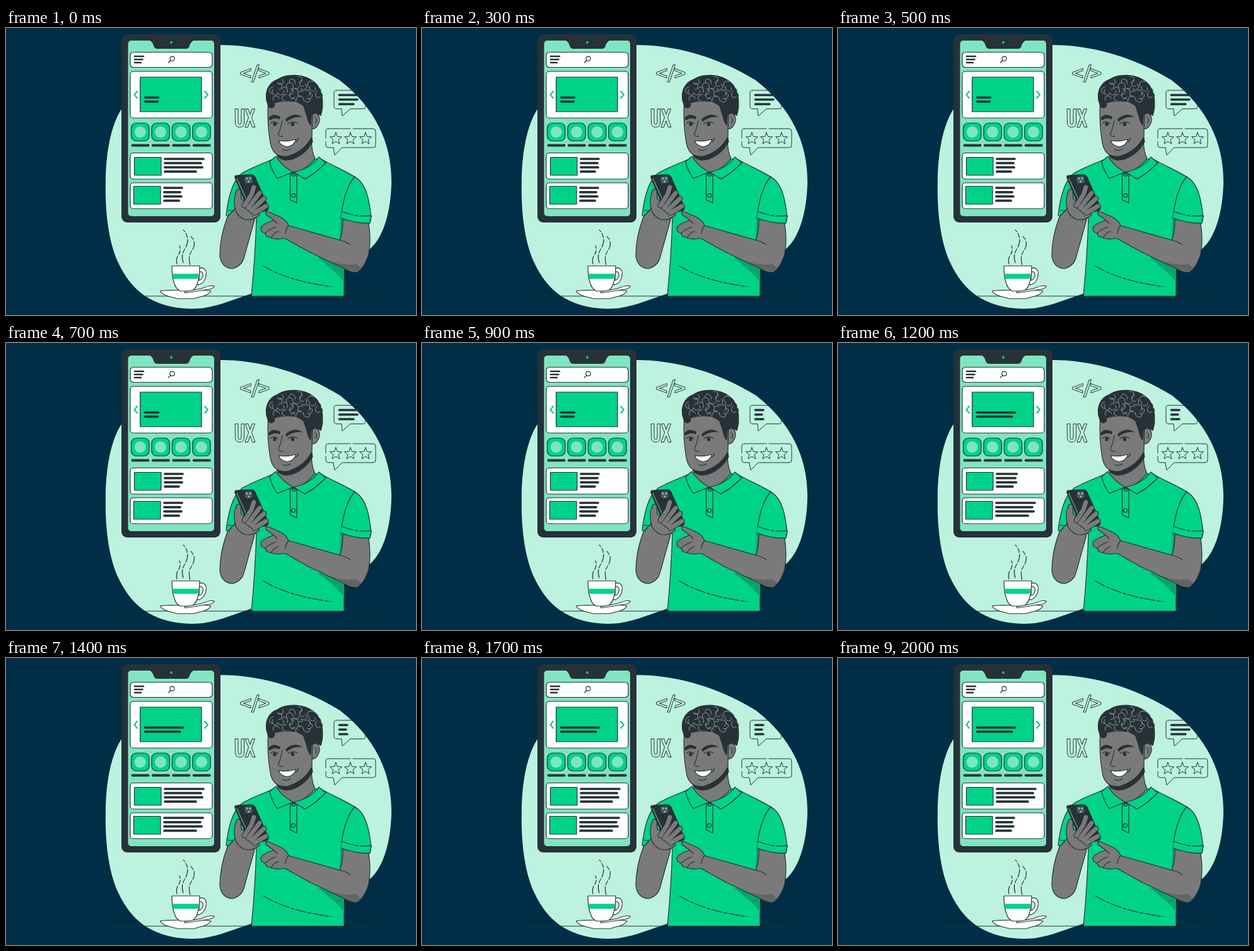
Animation, 650 px wide and 456 px high, one loop 2100 ms. Source, as an HTML page:

```html
<!DOCTYPE html>
<html lang="en">
<head>
<meta charset="utf-8">
<title>Designing a mobile app</title>
<style>
  html, body { margin: 0; width: 100%; height: 100%; overflow: hidden; background: #012e47; }
  svg { display: block; width: 650px; height: 456px; }
  .ink { stroke: #263238; stroke-width: 1.2; stroke-linejoin: round; stroke-linecap: round; }
  .thin { stroke-width: 1; }
  .line { fill: none; }
  .dark { fill: #263238; }
  .white { fill: #fff; }
  .green { fill: #00d387; }
  .shade { fill: #05a56d; }
  .mint { fill: #7fe5c1; }
  .skin { fill: #7a7a7a; }
  .dim { fill: #636363; }
  .bar { stroke: #263238; stroke-linecap: round; }
</style>
</head>
<body>
<svg viewBox="0 0 650 456">
  <path fill="#bdf2df" d="M335 27C405 26 474 49 529 83C586 127 612 184 611 246C610 299 595 340 572 355C535 382 448 403 389 422C351 435 325 446 298 446C225 446 196 410 179 375C162 340 157 290 158 246C158 200 166 155 183 129C213 74 269 29 335 27Z"/>
  <path class="ink line" d="M168 426H572M577 426H586M590 426H600"/>

  <g id="phone">
    <rect class="dark" x="183" y="10" width="157" height="299" rx="9"/>
    <rect class="mint" x="193.500" y="20" width="136.500" height="279" rx="5"/>
    <path class="dark" d="M225 18H301Q293 21 291 28Q290 33 285 33H240Q235 33 234 28Q232 21 225 18Z"/>
    <circle class="green" cx="262" cy="23" r="2"/>
    <g class="ink">
      <g class="white">
        <rect x="197" y="38.500" width="130" height="24" rx="5"/>
        <rect x="197" y="69" width="130" height="74" rx="4.500"/>
        <rect x="197" y="198.500" width="130" height="41.500" rx="4.500"/>
        <rect x="197" y="246" width="130" height="41" rx="4.500"/>
      </g>
      <g class="green">
        <rect x="212.700" y="78" width="97.300" height="55"/>
        <rect x="203.500" y="205.500" width="42.500" height="28.500"/>
        <rect x="202.500" y="251.500" width="42.500" height="28.500"/>
      </g>
      <circle class="line" cx="263.500" cy="48.700" r="3.500"/>
      <path class="line" d="M261 51.500L257.500 55"/>
    </g>
    <path class="bar" stroke-width="2.600" d="M204 45H218M204 50H216.500M204 55H214"/>
    <path fill="none" stroke="#00c880" stroke-width="2" d="M208.500 100L203.500 106L208.500 112M314.500 100L320 106L314.500 112"/>
    <g id="icons"></g>
  </g>

  <g id="signs" class="ink line thin">
    <path d="M388 64.500L371.500 70.500V73.500L388 79.500V76L376.500 72L388 68ZM398.500 58.500H401.500L392.500 86H389.500ZM401 64.500L417 70.500V73.500L401 79.500V76L412 72L401 68Z"/>
    <path d="M363.500 128.500h4.500v21q0 4 2.500 4t2.500-4v-21h4.500v21.500q0 7.500-7 7.500t-7-7.500ZM379.500 128.500h4.500l3 9 3-9h4.500l-5 14 5.500 15h-4.500l-3.500-10-3.500 10h-4.500l5.500-15Z"/>
    <path d="M524 99H558M562 99H566Q570 99 570 103V111M570 115V124Q570 128.500 566 128.500H546L533 140L532 128.500H524Q520 128.500 520 124V103Q520 99 524 99"/>
    <path d="M511 160H546M550 160H582Q586 160 586 164V186Q586 190 582 190H533L521 202L519 190H511Q507 190 507 186V180M507 175V164Q507 160 511 160"/>
  </g>

  <g id="cup" class="ink">
    <path class="line" stroke-dasharray="13 3 7 3" d="M271 375Q269 367 273 361Q278 354 275 346M281 373Q277 362 283 352Q290 341 287 331Q285 324 281 321M292 376Q288 364 294 355Q301 345 297 336L293 331"/>
    <path class="white" fill-rule="evenodd" d="M304 383C313 378 319 384 317 394C315 404 308 409 301 408ZM306 387V401C313 400 316 386 306 387Z"/>
    <path class="white" d="M244.500 418Q250 416.500 270 416.500H300Q320 416.500 325 418Q320 425 308 427L298 430H272L260 427Q248 424 244.500 418Z"/>
    <path class="white" d="M263 378H307Q307 396 303 407Q300 415 294 418H276Q269 414 267 406Q263 396 263 378Z"/>
    <path class="green" stroke="none" d="M264.500 390.500H305.500L304 398.500H265.500Z"/>
    <path class="white" d="M283 419L310 414Q324 408 330 410Q330 415 312 416.500L284 421Z"/>
  </g>

  <g id="man" class="ink">
    <path class="green" d="M424 208C404 217 386 223 374 231C358 243 352 271 349 298L382 302L397 303Q395 365 389 426H536V305L577 310L579 300C576 275 572 252 558 240C545 230 520 220 499 208Z"/>
    <path class="shade" stroke="none" d="M530 302L536 305V403Q522 386 495 366L526 351Q531 330 530 302Z"/>
    <path class="line" d="M553 236C541 250 534 272 531 302M389 250L387 260M352 289L373 294"/>
    <path class="line" stroke-dasharray="17 3 5 3" d="M408 378Q447 402 516 411"/>

    <path class="skin" d="M431 190V209Q438 224 455 232Q476 225 490 207Q484 198 484 169Z"/>
    <path class="dark" d="M429 200Q454 214 485 174L486 181C476 199 458 210 444 210Q435 209 430 203Z"/>
    <path class="skin" d="M481 140Q487 131 494 137Q500 144 495 153Q491 162 483 160Z"/>
    <path class="skin" d="M416 112C414 140 416 166 419 182C422 201 434 205 446 204Q473 196 485 173L486 118Z"/>
    <path class="dark" d="M415 121C408 103 416 87 430 82C446 71 473 74 486 84C502 94 505 122 499 139Q495 136 490 135L484 139L483 154Q479 150 477 140L472 124Q462 115 446 116Q430 116 419 122Z"/>
    <g id="curls" class="dark"></g>
    <path class="dark" stroke="none" d="M416 144Q422 134 435 141L434 145Q425 141 418 147ZM443 145Q457 132 471 142Q457 139 445 149Z"/>
    <path class="line" d="M438 147Q436 159 432 168Q431 173 439 172M420 151Q425 147 431 152M447 152Q454 147 462 151M490 143Q494 143 491 151M463 175Q464 179 460 181"/>
    <g class="dark" stroke="none"><ellipse cx="426" cy="153" rx="2.600" ry="3"/><ellipse cx="454.500" cy="153" rx="2.600" ry="3"/></g>
    <path class="white" d="M432 179Q446 181 460 177Q456 188 446 188.500Q436 188 432 179Z"/>
    <path class="line" d="M438 193Q445 196 451 192"/>

    <path class="green" d="M428 204L418 212Q421 227 430 239L455 229Q437 219 428 204ZM496 205L507 214Q492 230 474 240L456 229Q482 224 496 205Z"/>
    <path class="line" d="M450.500 231V273L461 278V232"/>
    <circle class="line" cx="456" cy="232.500" r="2.800"/>
    <circle class="line" cx="455.500" cy="266" r="3"/>

    <path class="skin" d="M351 300C344 319 339 337 339 361C340 376 350 383 361 382Q374 377 377 366L394 305L364 286Z"/>
    <path class="dark" d="M363 238Q362 234 367 234L388 233Q393 233 395 237L416 285Q416 290 411 291L386 293Z"/>
    <path class="line" style="stroke:#89969b" d="M366 239L380 270"/>
    <rect fill="#455a64" x="378" y="235" width="13" height="12" rx="3" transform="rotate(-5 384 241)"/>
    <g fill="#aab5b8" stroke="none"><circle cx="382" cy="239" r="1.500"/><circle cx="387" cy="239" r="1.500"/><circle cx="385" cy="244" r="1.500"/></g>
    <path class="skin" d="M364 290C360 276 362 265 366 257Q370 254 372 259L373 272L380 276L402 291L401 298Q391 307 378 304Q367 299 364 290Z"/>
    <g class="line">
      <path id="fingers" stroke-width="9" d="M378 282L389 265L393 253M384 286L402 262M389 290L409 271M394 294L412 283"/>
      <use href="#fingers" style="stroke:#7a7a7a" transform="translate(0 0)"/>
    </g>

    <path class="skin" d="M534 304L575 310Q579 337 575 359Q569 380 557 388Q547 389 536 382L481 356L442 334Q428 337 420 333Q411 332 411 326Q403 324 404 317Q408 311 420 307L424 305L412 296Q410 291 416 292L434 300Q445 305 448 314L529 337Q534 326 534 304Z"/>
    <path class="dim" stroke="none" d="M515 371Q536 378 556 375L562 382Q556 390 543 384Z"/>
    <path class="line" d="M411 326Q418 319 428 316M420 333Q424 326 432 323M424 305Q428 308 430 311M448 314Q443 320 443 327M529 337Q538 339 546 344"/>
    <path class="green" d="M532 293Q556 301 579 298L577 310Q555 311 531 302Z" stroke="none"/>
    <path class="line" d="M579 298L577 310Q555 311 531 302"/>
    <path class="line" stroke-dasharray="17 3 5 3" d="M534 292Q556 301 579 298"/>
  </g>
  <g id="bars" class="bar"></g>
</svg>
<script>
const $ = id => document.getElementById(id);
const add = (parent, tag, attrs) => {
  const el = document.createElementNS("http://www.w3.org/2000/svg", tag);
  for (const key in attrs) el.setAttribute(key, attrs[key]);
  return parent.appendChild(el);
};

for (let i = 0; i < 4; i++) {
  const x = 198.5 + i * 32.4;
  add($("icons"), "rect", { class: "green ink", x, y: 151, width: 28.5, height: 28.5, rx: 8 });
  add($("icons"), "circle", { class: "mint", cx: x + 14.2, cy: 165.3, r: 9 });
  add($("icons"), "path", { class: "bar", "stroke-width": 4, d: `M${x + 2} 186.500h25` });
}

for (const cx of [523, 546, 570]) {
  const points = Array.from({ length: 10 }, (_, i) => {
    const r = i % 2 ? 4.3 : 10, a = (i / 5 - 0.5) * Math.PI;
    return [cx + r * Math.cos(a), 176 + r * Math.sin(a)];
  });
  add($("signs"), "polygon", { points: points.join(" ") });
}

// Each finger is a skin-coloured stroke over a wider ink stroke
$("fingers").style.strokeWidth = 9;
const skinStroke = $("fingers").cloneNode();
skinStroke.removeAttribute("id");
skinStroke.style.cssText = "stroke:#7a7a7a;stroke-width:6.8";
document.querySelector("use").replaceWith(skinStroke);

// Bumpy rim of the hair, then loose curls inside it
for (let i = 0; i < 17; i++) {
  const a = Math.PI * (1 - 0.1 + i / 16 * 1.2);
  add($("curls"), "circle", { cx: 457.5 + 39 * Math.cos(a), cy: 112 + 31 * Math.sin(a), r: 6, stroke: "none" });
}
for (let i = 0; i < 26; i++) {
  const a = i * 2.4, r = Math.sqrt(i / 26);
  const x = 458 + 40 * r * Math.cos(a), y = 99 + 19 * r * Math.sin(a) + Math.max(0, Math.abs(x - 458) - 26) * 0.5;
  add($("curls"), "path", {
    fill: "none", style: "stroke:#a3abad;stroke-width:.8",
    d: "M-5 2Q-5-4 0-3Q5-2 5 3", transform: `translate(${x} ${y}) rotate(${i * 97})`
  });
}

const LOOP = 2100;
// keys: [time, openness]; closed and open list the right edges
const groups = [
  { x: 220.5, y: 110.5, step: 6.5, width: 3.5, closed: [241.5, 240.5], open: [281, 276],
    keys: [[0, 0], [900, 0], [1200, 1], [2000, 1], [2100, 0]] },
  { x: 252, y: 208, step: 6.7, width: 3.7, closed: [280, 278, 279, 274], open: [313, 309, 311, 301],
    keys: [[0, 1], [300, 0], [1150, 0], [1400, 1], [2100, 1]] },
  { x: 251, y: 254, step: 6.8, width: 3.7, closed: [279, 276, 278, 274], open: [312, 308, 310, 301],
    keys: [[0, 0], [900, 0], [1200, 1], [1700, 1], [2000, 0], [2100, 0]] },
  { x: 528.5, y: 106.5, step: 7.3, width: 3.5, closed: [541, 539, 541], open: [559, 557, 551],
    keys: [[0, 1], [700, 1], [900, 0], [1800, 0], [2000, 1], [2100, 1]] }
];
for (const g of groups) {
  g.bars = g.open.map((_, i) => add($("bars"), "line", {
    x1: g.x, y1: g.y + i * g.step, y2: g.y + i * g.step, "stroke-width": g.width
  }));
}

function valueAt(keys, t) {
  const i = keys.findIndex(key => key[0] > t);
  const [t0, v0] = keys[i - 1], [t1, v1] = keys[i];
  const p = (t - t0) / (t1 - t0);
  return v0 + (v1 - v0) * p * p * (3 - 2 * p);
}

const start = performance.now();
function draw() {
  const t = Math.floor((performance.now() - start) % LOOP / 100) * 100;
  for (const { bars, closed, open, keys } of groups) {
    const v = valueAt(keys, t);
    bars.forEach((bar, i) => bar.setAttribute("x2", closed[i] + (open[i] - closed[i]) * v));
  }
  requestAnimationFrame(draw);
}
draw();
</script>
</body>
</html>
```
